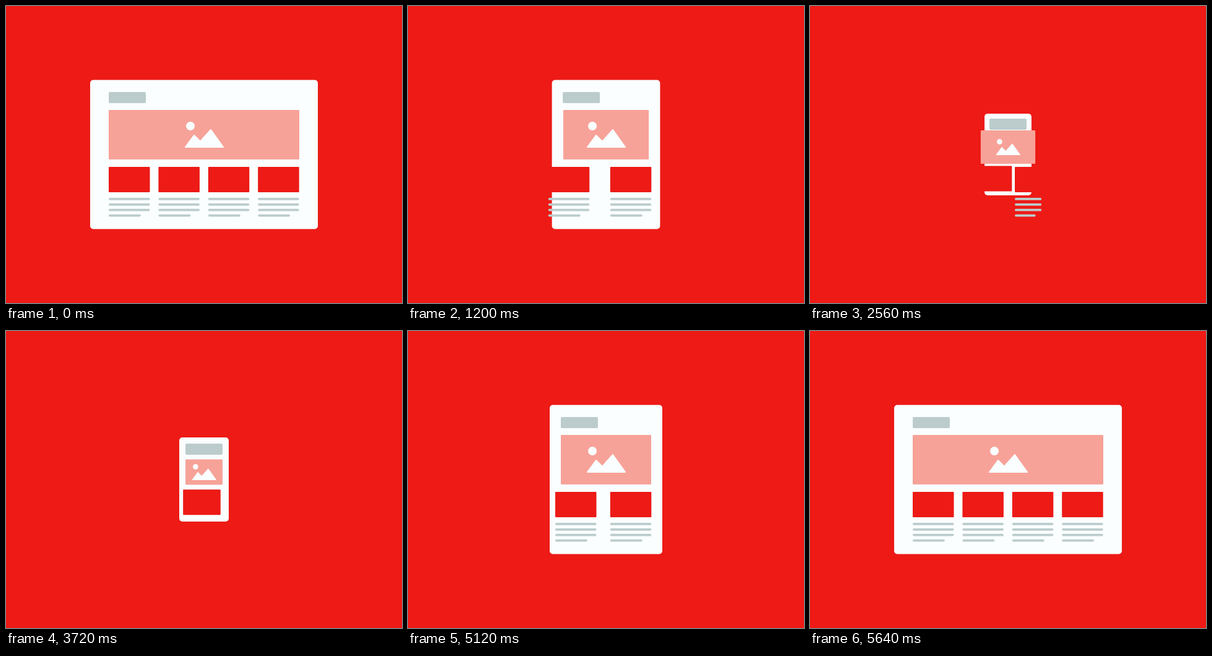
These frames come from a looping animation (640x480 px, 5720 ms). An HTML page with a canvas:

```html
<!DOCTYPE html>
<html lang="en">
<head>
<meta charset="utf-8">
<title>Responsive layout</title>
<style>
  html, body { margin: 0; width: 100%; height: 100%; overflow: hidden; background: #ed1a16; }
  canvas { display: block; width: 640px; height: 480px; }
</style>
</head>
<body>
<canvas id="stage" width="640" height="480"></canvas>
<script>
const ctx = document.getElementById('stage').getContext('2d');
const LOOP = 5720, STEP = 40, CENTER = 320;
const RED = '#ed1a16', WHITE = '#fafeff', GREY = '#bccccc', PINK = '#f7a298';
const TILE = { w: 66.5, h: 41, pitch: 80.4, left: 166, top: 260 };

const mix = (a, b, u) => a + (b - a) * u;
const clamp = u => Math.max(0, Math.min(1, u));
const easeInOut = (u, power) =>
  u < 0.5 ? 2 ** (power - 1) * u ** power : 1 - (2 - 2 * u) ** power / 2;

// Rises past 1 by `over`, then settles back; without `over` it is a plain ease.
function ease(u, over = 0, power = 3) {
  if (!over) return easeInOut(u, power);
  const rise = 0.45;
  return u < rise
    ? (1 + over) * easeInOut(u / rise, 3)
    : 1 + over * (1 - easeInOut((u - rise) / (1 - rise), 2));
}

const desktop = {
  card: { w: 368, h: 241 }, head: { x: 166, y: 139 }, hero: { w: 308, h: 80 },
  icon: { y: 208, scale: 1 }, lead: { x: TILE.left, y: TILE.top, w: TILE.w },
  side: { wide: 1, pair: 1 }
};
const tablet = {
  ...desktop,
  card: { w: 182, h: 241 }, head: { x: 247, y: 139 }, hero: { w: 146, h: 80 },
  lead: { ...desktop.lead, x: 247 }, side: { wide: 0, pair: 1 }
};
const phone = {
  card: { w: 80, h: 136 }, head: { x: 290, y: 182 }, hero: { w: 60, h: 41 },
  icon: { y: 228, scale: 0.62 }, lead: { x: 290, y: 256, w: 60 },
  side: { wide: 0, pair: 0 }
};

// Each part: [delay, duration, overshoot, easing power].
const changes = [
  { at: 960, to: tablet, card: [0, 460, 0.04], head: [0, 460, 0.04], hero: [0, 460, 0.05],
    lead: [0, 425, 0, 5], side: [0, 220] },
  { at: 2400, to: phone, card: [-20, 400, 0.04], head: [0, 150], hero: [30, 230],
    icon: [0, 150], lead: [40, 270], side: [40, 270] },
  { at: 3680, to: tablet, card: [80, 560, 0.1], head: [120, 420], hero: [100, 240],
    icon: [170, 430], lead: [0, 190, 0, 2], side: [30, 190] },
  { at: 4920, to: desktop, card: [210, 400, 0.1], head: [210, 330], hero: [210, 330],
    lead: [0, 540, 0, 5], side: [240, 280] }
];

function pose(part, t) {
  const state = { ...desktop[part] };
  for (const change of changes) {
    if (!change[part]) continue;
    const [delay, duration, over, power] = change[part];
    const u = ease(clamp((t - change.at - delay) / duration), over, power);
    for (const key in state) state[key] = mix(state[key], change.to[part][key], u);
  }
  return state;
}

// Text lines retract from the last one up and later grow from the first one down.
const leadLine = (i, t) =>
  1 - clamp((t - 1640 - 160 * (3 - i)) / 160) + clamp((t - 3840 - 260 * i) / 190);

function box(x, y, w, h, color, radius = 1) {
  if (w < 0.3) return;
  ctx.fillStyle = color;
  ctx.beginPath();
  ctx.roundRect(x, y, w, h, Math.min(radius, w / 2, h / 2));
  ctx.fill();
}

function drawColumn(x, y, w, lineScale) {
  box(x, y, w, TILE.h, RED);
  for (let i = 0; i < 4; i++) {
    const full = i < 3 ? w : w * 0.78;
    box(x, y + 50 + 8.9 * i, full * lineScale(i), 3.8, GREY, 2);
  }
}

function drawIcon({ y, scale }) {
  ctx.save();
  ctx.translate(CENTER, y);
  ctx.scale(scale, scale);
  ctx.fillStyle = ctx.strokeStyle = WHITE;
  ctx.lineJoin = 'round';
  ctx.lineWidth = 2;
  ctx.beginPath();
  ctx.arc(-22, -14, 7, 0, Math.PI * 2);
  ctx.fill();
  ctx.beginPath();
  for (const [px, py] of [[-30, 20], [-16, 1], [-6, 11], [11, -8], [31, 20]]) ctx.lineTo(px, py);
  ctx.closePath();
  ctx.fill();
  ctx.stroke();
  ctx.restore();
}

function draw(t) {
  ctx.fillStyle = RED;
  ctx.fillRect(0, 0, 640, 480);
  const [card, head, hero, icon, lead, side] =
    ['card', 'head', 'hero', 'icon', 'lead', 'side'].map(part => pose(part, t));

  box(CENTER - card.w / 2, 240 - card.h / 2, card.w, card.h, WHITE, 5);
  box(head.x, head.y, 60, 18, GREY, 2);
  box(CENTER - hero.w / 2, icon.y - hero.h / 2, hero.w, hero.h, PINK);
  drawIcon(icon);

  for (let i = 1; i < 4; i++) {
    const scale = i === 2 ? side.pair : side.wide;
    const shift = 0.18 * TILE.w * (1 - scale);
    drawColumn(TILE.left + TILE.pitch * i + shift, TILE.top, TILE.w * scale, () => 1);
  }
  drawColumn(lead.x, lead.y, lead.w, i => leadLine(i, t));
}

const origin = performance.now();
function tick() {
  const t = (performance.now() - origin) % LOOP;
  draw(Math.floor(t / STEP) * STEP);
  requestAnimationFrame(tick);
}
tick();
</script>
</body>
</html>
```
